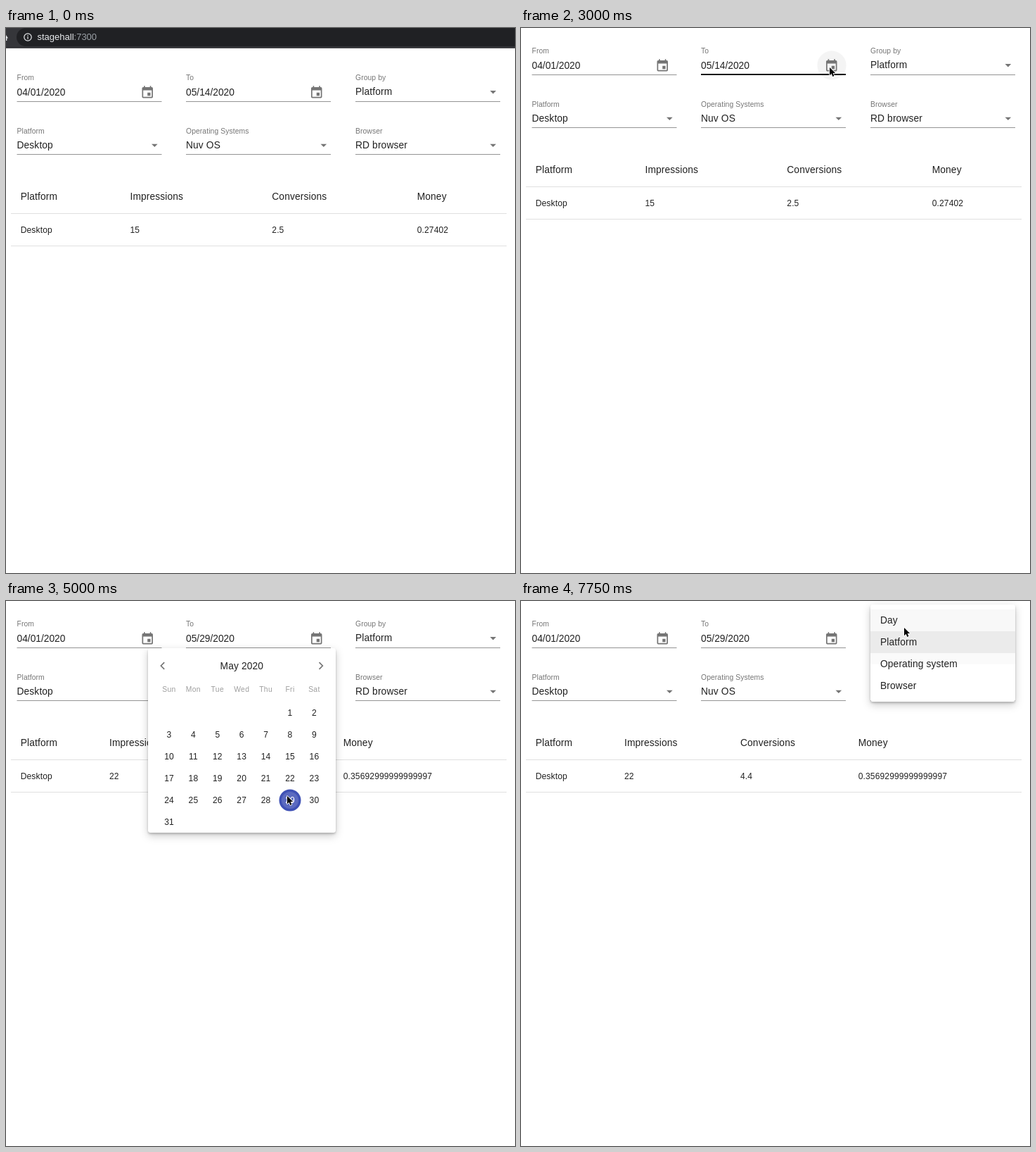
An HTML page that plays this animation: 724x774 px, repeating every 8 s.

```html
<!DOCTYPE html>
<html lang="en">
<head>
<meta charset="utf-8">
<style>
  html, body { margin: 0; width: 100%; height: 100%; overflow: hidden; background: #fff; }
  svg { display: block; font-family: "Liberation Sans", Arial, sans-serif; }
  text { white-space: pre; }
  .body { font-size: 13.78px; letter-spacing: .129px; fill: #212121; }
  .input { font-size: 13.78px; fill: #212121; }
  .cell { font-size: 12.05px; letter-spacing: .129px; fill: #212121; }
  .label { font-size: 10.33px; letter-spacing: .097px; fill: #757575; }
  .weekday { font-size: 10.33px; letter-spacing: .344px; fill: #9e9e9e; }
  .url { font-size: 13px; fill: #e8eaed; }
  .mid { text-anchor: middle; }
  .paper { fill: #fff; filter: drop-shadow(0 2px 1.5px rgba(0,0,0,.2)) drop-shadow(0 4px 6px rgba(0,0,0,.2)); }
</style>
</head>
<body>
<svg id="stage" width="724" height="774" viewBox="0 0 724 774"></svg>
<script>
const LOOP = 8000, STEP = 250;
const stage = document.getElementById('stage');
const COLUMNS = [15.5, 256, 497];
const FIELD_WIDTH = 206;
const BLUE = '#3f51b5';

// Pointer stops: [time, x, y]
const POINTER = [
  [500, 426, 33], [750, 383, 57], [1000, 434.5, 82], [1250, 436, 82], [1500, 438, 65],
  [1750, 435, 46], [2750, 440, 61], [3000, 439, 56], [4000, 405, 248], [4250, 401, 271],
  [4500, 400, 277], [5500, 520, 333], [5750, 521, 334], [6000, 521, 329], [6250, 564, 2],
  [6500, 564, 43], [6750, 564, 51], [7500, 553, 75], [7750, 545, 38]
];

const text = (x, y, cls, str) => `<text x="${x}" y="${y}" class="${cls}">${str}</text>`;
const rect = (x, y, w, h, fill, extra = '') =>
  `<rect x="${x}" y="${y}" width="${w}" height="${h}" fill="${fill}" ${extra}/>`;
const circle = (x, y, r, fill, extra = '') =>
  `<circle cx="${x}" cy="${y}" r="${r}" fill="${fill}" ${extra}/>`;
const shade = opacity => `rgba(0,0,0,${opacity})`;
const icon = (x, y, d) =>
  `<path transform="translate(${x} ${y}) scale(.861)" fill="#757575" d="${d}"/>`;

const CALENDAR = 'M17 12h-5v5h5zM16 1v2H8V1H6v2H5a2 2 0 0 0-2 2v14a2 2 0 0 0 2 2h14a2 2 0 0 0 2-2V5a2 2 0 0 0-2-2h-1V1zm3 18H5V8h14z';
const TRIANGLE = 'M7 10l5 5 5-5z';

function underline(x, y, active) {
  return active ? rect(x, y - 1, FIELD_WIDTH, 2, '#111') : rect(x, y, FIELD_WIDTH, 1, '#949494');
}

function dateField(col, label, value, active) {
  const x = COLUMNS[col];
  return text(x, 36, 'label', label) + text(x, 58, 'input', value) +
    icon(x + 175.4, 43.5, CALENDAR) + underline(x, 66, active);
}

function selectField(col, top, label, value, active) {
  const x = COLUMNS[col];
  return text(x, top + 36, 'label', label) + text(x, top + 57.3, 'body', value) +
    icon(x + 185.5, top + 42.5, TRIANGLE) + underline(x, Math.floor(top) + 66, active);
}

function table(xs, values) {
  const heads = ['Platform', 'Impressions', 'Conversions', 'Money'];
  return heads.map((head, i) =>
      text(xs[i], 206, 'body', head) + text(xs[i], 253.3, 'cell', values[i])).join('') +
    rect(7, 225, 705, 1, '#e0e0e0') + rect(7, 271, 705, 1, '#e0e0e0');
}

function addressBar() {
  return rect(0, 0, 724, 28.5, '#35363a') + rect(15, 0, 740, 26, '#202124', 'rx="13"') +
    rect(0, 27.5, 724, 1, '#202124') +
    '<path d="M0 10l3 4.500H1.300V18H0z" fill="#e8eaed"/>' +
    circle(31, 13, 5.2, 'none', 'stroke="#e8eaed" stroke-width="1.2"') +
    rect(30.4, 12.2, 1.2, 3.6, '#e8eaed') + rect(30.4, 10, 1.2, 1.3, '#e8eaed') +
    text(44.5, 17.3, 'url', 'stagehall<tspan fill="#9aa0a6">:7300</tspan>');
}

function datePicker(t) {
  const selected = t < 5000 ? 14 : 29;
  const hovered = t < 4000 ? 0 : t < 4500 ? 22 : t < 5000 ? 29 : 0;
  const colX = i => 232 + i * 34.4;
  let out = rect(202, 67, 267, 262, '#fff', 'rx="3.4" class="paper"') +
    text(335.3, 96.7, 'body mid', 'May 2020') +
    '<path d="M225.200 87.200l-4.800 4.800 4.800 4.800M445.500 87.200l4.800 4.800-4.800 4.800" fill="none" stroke="#757575" stroke-width="1.700"/>';
  ['Sun', 'Mon', 'Tue', 'Wed', 'Thu', 'Fri', 'Sat'].forEach((name, i) => {
    out += text(colX(i), 129.2, 'weekday mid', name);
  });
  for (let day = 1; day <= 31; day++) {
    const cell = day + 4, x = colX(cell % 7), y = 159 + 31 * Math.floor(cell / 7);
    if (day === selected) {
      out += circle(x, y, 15.5, BLUE);
      if (day === 29 && t < 5250) out += circle(x, y, 12, 'rgba(255,255,255,.15)');
    } else if (day === hovered) {
      out += circle(x, y, 15.5, shade(.04));
    }
    out += `<g ${day === selected ? 'style="--ink:#fff"' : ''}>` +
      `<text x="${x}" y="${y + 4.4}" class="cell mid" style="fill:var(--ink,#212121)">${day}</text></g>`;
  }
  return out;
}

function menu(t) {
  const hovering = t >= 7750;
  let out = rect(497, 5, 206, 138, '#fff', 'rx="3.4" class="paper"');
  if (hovering) out += rect(497, 12, 206, 31, '#f8f8f8') + rect(497, 74, 206, 15.5, '#fafafa');
  out += rect(497, 43, 206, 31, '#ebebeb');
  ['Day', 'Platform', 'Operating system', 'Browser'].forEach((item, i) => {
    out += text(511, 32.2 + 31 * i, 'body', item);
  });
  return out;
}

function pointer(t) {
  const stop = POINTER.filter(p => p[0] <= t).pop();
  return stop ? `<path transform="translate(${stop[1]} ${stop[2]})" d="M0 0v11.200l2.600-2.400 1.800 4.200 2-.9-1.800-4h3.500z" stroke="#fff" stroke-width="1.600" paint-order="stroke" stroke-linejoin="round"/>` : '';
}

function scene(t) {
  const between = (from, to) => t >= from && t < to;
  const updated = t >= 5000;
  const ripple = between(2750, 3500) ? .045 : between(3500, 3750) ? .02 : 0;
  const page =
    (ripple ? circle(442, 53, 20.66, shade(ripple)) : '') +
    dateField(0, 'From', '04/01/2020', false) +
    dateField(1, 'To', updated ? '05/29/2020' : '05/14/2020', between(2750, 3500)) +
    selectField(2, 0, 'Group by', 'Platform', t >= 6500) +
    selectField(0, 75.7, 'Platform', 'Desktop', false) +
    selectField(1, 75.7, 'Operating Systems', 'Nuv OS', false) +
    selectField(2, 75.7, 'Browser', 'RD browser', false) +
    (updated
      ? table([20.7, 147, 312, 479.7], ['Desktop', '22', '4.4', '0.35692999999999997'])
      : table([20.7, 176.5, 378.3, 584.7], ['Desktop', '15', '2.5', '0.27402']));
  return (t < 1250 ? addressBar() + `<g transform="translate(0 38)">${page}</g>` : page) +
    (between(3500, 6000) ? datePicker(t) : '') +
    (t >= 7250 ? menu(t) : '') +
    pointer(t);
}

let shown = -1;
function tick() {
  const step = Math.floor(performance.now() % LOOP / STEP);
  if (step !== shown) stage.innerHTML = scene((shown = step) * STEP);
  requestAnimationFrame(tick);
}
tick();
</script>
</body>
</html>
```
